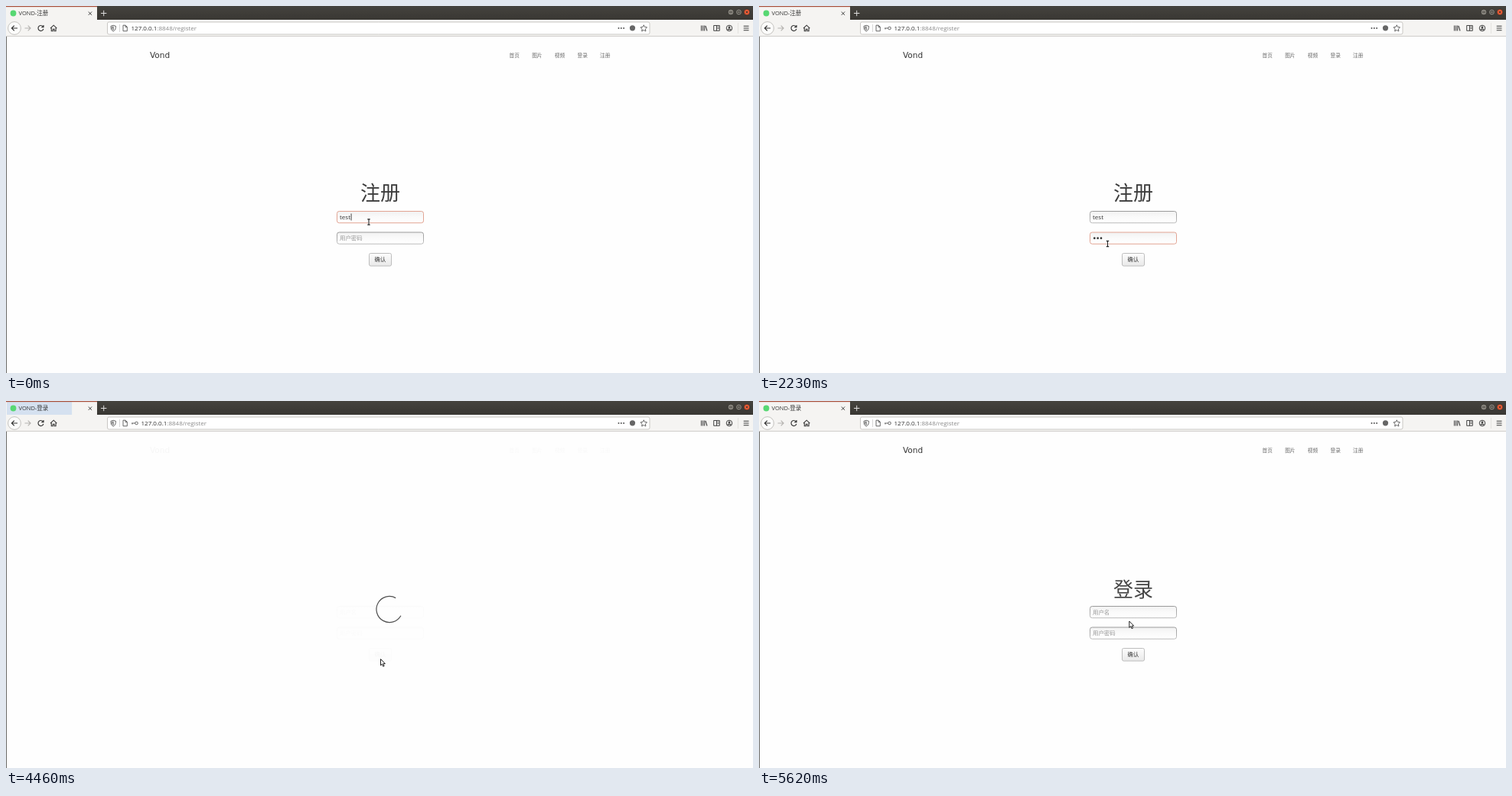
An HTML page with a canvas that plays this animation: 976x480 px, repeating every 5650 ms.

```html
<!DOCTYPE html>
<html lang="zh">
<head>
<meta charset="utf-8">
<style>
html, body { margin: 0; width: 100%; height: 100%; overflow: hidden; background: #fefefe; }
canvas { display: block; }
</style>
</head>
<body>
<canvas width="976" height="480"></canvas>
<script>
const c = document.querySelector('canvas').getContext('2d');
const LOOP = 5650;
const SANS = '"Open Sans", "Noto Sans CJK SC", "Noto Sans CJK JP", sans-serif';
const WIDE = '"DejaVu Sans", sans-serif';
const MONO = '"DejaVu Sans Mono", monospace';

// y is the optical middle of the line
function text(s, x, y, size, color, { font = SANS, align = 'left', style = '' } = {}) {
  c.font = `${style} ${size}px ${font}`;
  c.textAlign = align;
  c.fillStyle = color;
  c.fillText(s, x, y + size * .37);
}
function rect(x, y, w, h, color) {
  c.fillStyle = color;
  c.fillRect(x, y, w, h);
}
function path(d, stroke, width = 1, fill) {
  const p = new Path2D(d);
  if (fill) { c.fillStyle = fill; c.fill(p); }
  if (stroke) { c.strokeStyle = stroke; c.lineWidth = width; c.stroke(p); }
}
function circle(x, y, r, fill, stroke, width = 1) {
  c.beginPath();
  c.arc(x, y, r, 0, 7);
  if (fill) { c.fillStyle = fill; c.fill(); }
  if (stroke) { c.strokeStyle = stroke; c.lineWidth = width; c.stroke(); }
}
function box(x, y, w, h, r, fill, stroke) {
  c.beginPath();
  c.roundRect(x, y, w, h, r);
  c.fillStyle = fill;
  c.fill();
  if (stroke) { c.strokeStyle = stroke; c.lineWidth = 1; c.stroke(); }
}
function shade(y0, y1, ...colors) {
  const g = c.createLinearGradient(0, y0, 0, y1);
  colors.forEach((k, i) => g.addColorStop(i / (colors.length - 1), k));
  return g;
}
const clamp = v => Math.min(1, Math.max(0, v));

// CSS "ease": cubic-bezier(.25, .1, .25, 1)
function ease(p) {
  let lo = 0, hi = 1, u = p;
  for (let i = 0; i < 20; i++) {
    u = (lo + hi) / 2;
    const x = .75 * u * (1 - u) ** 2 + .75 * u * u * (1 - u) + u ** 3;
    if (x < p) lo = u; else hi = u;
  }
  return .3 * u * (1 - u) ** 2 + 3 * u * u * (1 - u) + u ** 3;
}

function keyIcon(x, y) {
  circle(x + 6, y, 1.8, null, '#555', .9);
  path(`M${x - .5} ${y}h4.7M${x + .5} ${y}v1.5`, '#555', .9);
}

function chrome(t, login) {
  rect(0, 0, 976, 18, shade(0, 18, '#45433e', '#393733'));
  rect(0, 0, 119, 18, '#f5f4f2');
  if (t > 4440 && t < 4740) {
    c.globalAlpha = 1 - (t - 4440) / 300;
    rect(1, 1, Math.min(118, 85 + (t - 4460) * .12), 17, '#d3e0f0');
    c.globalAlpha = 1;
  }
  rect(0, 0, 119, 1.2, '#a8503c');
  circle(9.5, 9.5, 3.9, '#57d873');
  text(login ? 'VOND-登录' : 'VOND-注册', 16.5, 9.7, 7.5, '#333');
  path('M107.7 7.5l4.4 4.4m0-4.4l-4.4 4.4', '#444', 1);
  path('M124 9.5h7.4M127.7 5.8v7.4', '#ddd', 1);
  for (const [x, k] of [[947, '#85827b'], [957.5, '#85827b'], [968, '#ea5b35']])
    circle(x, 8, 4, k, '#2d2b28', .8);
  path('M945 8h4M956 6.5h3v3h-3zM966.5 6.5l3 3m0-3l-3 3', '#35332f', .8);

  rect(0, 18, 976, 22, '#f5f4f2');
  rect(0, 39, 976, 1, '#cfcdca');
  circle(11, 29, 8.4, '#fcfcfb', '#bdbbb8', .9);
  path('M15 29h-7.5m3.3-3.4l-3.4 3.4l3.4 3.4', '#333', 1.2);
  path('M24.5 29h7.5m-3.3-3.4l3.4 3.4l-3.4 3.4', '#b4b2af', 1.1);
  path('M48.4 27a3.5 3.5 0 1 0 .5 3M49 25v2.6h-2.7', '#3a3a3a', 1.2);
  path('M58 29.2l4.2-4l4.2 4M59.3 28.5v4.2h2v-2.4h1.8v2.4h2v-4.2', '#3a3a3a', 1.1);

  box(132.5, 21, 708.5, 16, 2, '#fff', '#c9c7c4');
  path('M140.2 25.3l3.2 1v2.2q0 3-3.2 4.6q-3.2-1.6-3.2-4.6v-2.2zM140.2 27v4.2l-1.7-2v-1.7z', '#555', .9);
  rect(148, 24, .8, 10, '#ccc');
  path('M153 25.2h3.2l2.1 2.1v5.5h-5.3zM156 25.3v2.2h2.2', '#555', .9);
  const secure = t >= 1930;
  if (secure) keyIcon(164.5, 29);
  const x = secure ? 176.5 : 163.5;
  text('127.0.0.1', x, 29.2, 8, '#2c2c2c');
  text(':8848/register', x + c.measureText('127.0.0.1').width, 29.2, 8, '#8b8b8b');
  for (const dx of [0, 3.3, 6.6]) circle(800.5 + dx, 29, 1, '#555');
  circle(818.5, 28.8, 3.6, '#666');
  path('M833.3 24.8l1.3 2.7l3 .4l-2.2 2.1l.5 3l-2.6-1.4l-2.6 1.4l.5-3l-2.2-2.1l3-.4z', '#555', .9);
  path('M908.5 25.5v7M910.6 25.5v7M912.7 25.5v7M914 26l2 6.5', '#444', 1.1);
  path('M924.7 25.5h7.6v6.8h-7.6zM928.5 25.5v6.8M929.5 27.5h2M929.5 29.5h2', '#444', 1);
  circle(945, 29, 3.8, null, '#444', 1);
  circle(945, 27.9, 1.4, '#444');
  path('M942.5 31.5q2.5-2.5 5 0', '#444', 1.2);
  rect(956, 22, .7, 14, '#dddbd8');
  path('M963.7 26.3h6.8M963.7 29h6.8M963.7 31.7h6.8', '#3a3a3a', 1.1);
}

function field(y, focus) {
  box(432.5, y + .5, 113, 15.2, 2.8, shade(y, y + 16, '#f1f1f1', '#fafafa', '#fff'),
    focus ? '#e2a493' : shade(y, y + 16, '#9a9a9a', '#bcbcbc'));
}
const caret = (x, y) => rect(x, y - 4.5, .9, 9, '#333');

function page(t, login) {
  rect(0, 40, 976, 440, '#fefefe');
  text('Vond', 188, 64.6, 10.5, '#333', { font: WIDE });
  ['首页', '图片', '视频', '登录', '注册'].forEach((s, i) =>
    text(s, 657.5 + i * 29.65, 64.8, 6.7, '#6c6c6c'));

  const inPass = !login && t >= 1030;
  field(268, !login && !inPass);
  field(295.5, inPass);
  if (login) text('用户名', 436, 276, 7.4, '#999');
  else text('test', 436, 276, 8, '#333');
  if (!login && !inPass) caret(450.6, 276);

  const dots = login ? 0 : [1870, 2000, 2190, 2320].filter(k => t >= k).length;
  if (!dots) text('用户密码', 436, 303.7, 7.4, '#999');
  for (let i = 0; i < dots; i++) circle(438.3 + i * 4.35, 303.7, 1.35, '#333');
  if (inPass && (dots == 0 || dots == 4)) caret(dots ? 453.2 : 435.6, 303.7);

  box(474.5, 323.5, 29, 16.5, 2, shade(323, 340, '#fdfdfd', '#e9e9e9'), '#bdbdbd');
  text('确认', 489, 331.7, 7.4, '#333', { align: 'center' });

  const p = login ? ease(clamp((t - 4900) / 1000)) : 1;
  c.globalAlpha = p;
  text(login ? '登录' : '注册', 489, 244.6 + 39 * (1 - p), 26, '#3c3c3c', { align: 'center' });
  c.globalAlpha = 1;
}

function popup() {
  c.save();
  c.shadowColor = 'rgba(0,0,0,.35)';
  c.shadowBlur = 6;
  c.shadowOffsetY = 1.5;
  rect(432, 313, 170, 56, '#fff');
  c.restore();
  rect(432, 347, 170, 22, '#ebebeb');
  rect(432, 346.6, 170, .7, '#d6d6d6');
  c.strokeStyle = '#c6c6c6';
  c.lineWidth = .8;
  c.strokeRect(432, 312.6, 170, 56.4);
  keyIcon(435.7, 320);
  text('Use a Securely Generated Password', 446, 320.2, 7.45, '#222');
  text('ukFyX8MGkWSm84x', 446, 330.2, 7.75, '#777', { font: MONO });
  text('Tidefin will save this password for this web site.', 446, 341, 6.5, '#777', { style: 'italic' });
  text('View Saved Logins', 517, 358, 7.5, '#222', { align: 'center' });
}

function loader(t) {
  const a = clamp(1 - (t - 4457) / 100);
  if (t < 4250 || !a) return;
  c.globalAlpha = a;
  rect(0, 40, 976, 440, '#fefefe');
  const start = .5 + (t - 4460) / 2000 * Math.PI * 2;
  c.beginPath();
  c.arc(501, 272.5, 17, start, start + Math.PI * 1.5);
  c.strokeStyle = '#4a4a4a';
  c.lineWidth = 1.2;
  c.stroke();
  c.globalAlpha = 1;
}

// [time, x, y] of the pointer's hot spot
const route = [
  [0, 474, 282.5], [300, 474, 282.5], [800, 453, 306], [1860, 452.5, 306], [2000, 455.5, 311],
  [3090, 455.5, 311], [3190, 464.8, 313.5], [3430, 489.5, 337.5], [4560, 489.5, 337.5],
  [5120, 496, 295], [5220, 495, 293.5], [5620, 483.8, 288], [LOOP, 483.8, 288]
];
function pointer(t) {
  const i = route.findIndex(k => k[0] > t);
  const [t0, x0, y0] = route[i - 1], [t1, x1, y1] = route[i];
  const p = (t - t0) / (t1 - t0);
  const x = x0 + (x1 - x0) * p, y = y0 + (y1 - y0) * p;
  const inField = v => y > v && y < v + 16.5;
  const beam = t < 4250 && (t < 1100 || t >= 1900) && (inField(268) || inField(295.5));
  if (beam) {
    const d = `M${x - 1.7} ${y - 3.6}h3.4M${x} ${y - 3.6}v7.2M${x - 1.7} ${y + 3.6}h3.4`;
    path(d, '#fff', 2.2);
    path(d, '#222', 1.1);
  } else {
    path(`M${x} ${y}v8.3l1.9-1.7l1.4 3.1l1.4-.6l-1.4-3h2.6z`, '#222', 1, '#fff');
  }
}

function draw(now) {
  const t = now % LOOP, login = t >= 4250;
  page(t, login);
  loader(t);
  rect(0, 40, 1, 440, '#6b6a68');
  chrome(t, login);
  if (t >= 1100 && t < 1870) popup();
  pointer(t);
  requestAnimationFrame(draw);
}
requestAnimationFrame(draw);
</script>
</body>
</html>
```
